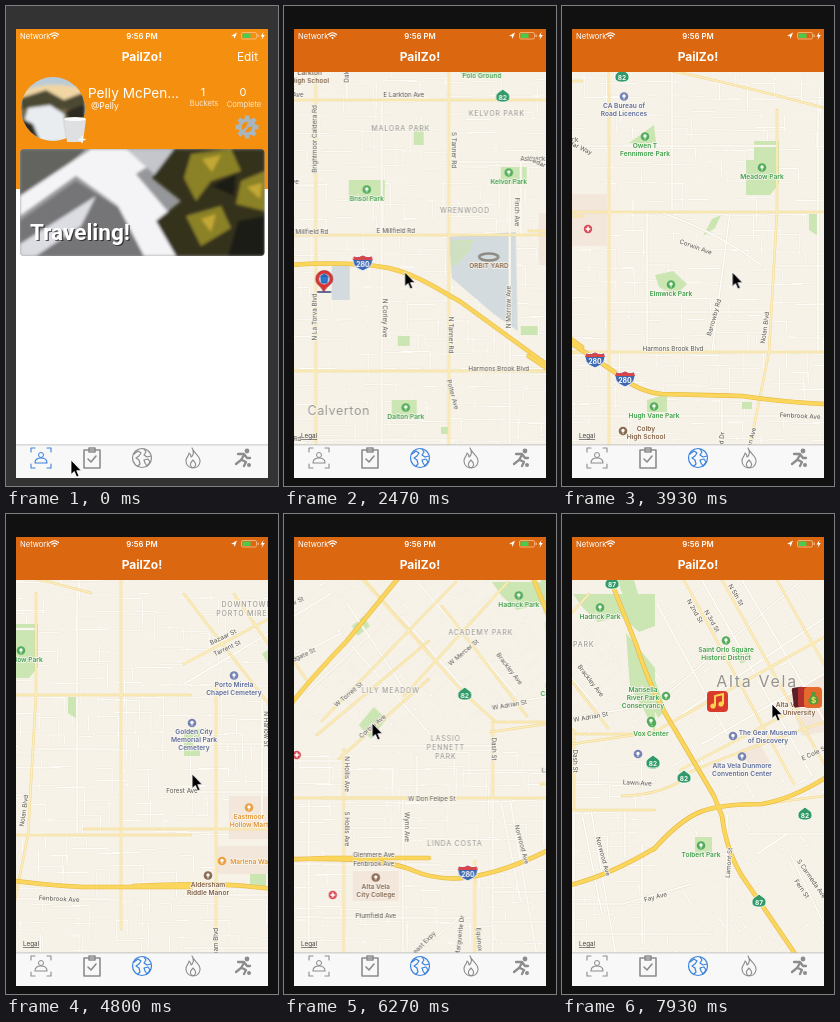
Animation, 272 px wide and 480 px high, one loop 8 s. Source, as an HTML page:

```html
<!DOCTYPE html>
<html lang="en">
<head>
<meta charset="utf-8">
<title>Bucket map</title>
<style>
html,body{margin:0;width:100%;height:100%;overflow:hidden;background:#111}
svg{display:block;width:100vw;height:100vh;font-family:Inter,Roboto,"Liberation Sans",sans-serif}
.r,.p,.k,.b,.o,.a,.c{text-anchor:middle;paint-order:stroke;stroke:#faf7ef;stroke-width:1.6px;stroke-linejoin:round;font-size:6.6px}
.r{fill:#55534e;font-size:6.3px}
.p{fill:#3f9f4b;font-weight:600}
.k{fill:#806046;font-weight:600}
.b{fill:#5d6c9c;font-weight:600}
.o{fill:#e2922f;font-weight:600}
.a{fill:#a09e99;font-size:7px;letter-spacing:.8px;font-weight:500}
.c{fill:#96938e;font-size:12.5px;letter-spacing:.6px}
.big{font-size:16px;letter-spacing:1.7px}
</style>
</head>
<body>
<svg viewBox="0 0 272 480" xmlns="http://www.w3.org/2000/svg"></svg>
<script>
const LOOP = 8000, SWITCH = 1000;

// Each region is drawn in its own view; `at` shifts it into the world.
const regions = [
  { at: [0, 0],
    grey: 'M133 262H151V296H133ZM250 233L317 228 319 327 295 310 253 274Z',
    park: 'M37 161H48V189H25V173H37ZM150 176H186V197H150ZM215 122H225V141H215ZM10 338H38V357H10ZM193 396H218V414H193ZM199 332H211V342H199ZM242 423H249V430H242ZM302 163H328V180H302ZM322 322H339V331H322ZM256 236H275L270 247 256 262ZM262 66H302V70H262Z',
    main: 'M0 96H350M0 231H350M0 367H350M117 60V480M250 60V480M52 60V250',
    minor: 'M0 182H117M52 250V450M183 96V440M311 180V440M0 436H262M148 60V96M10 140H52M250 158H350M322 158V230',
    hwy: 'M-10 261L90 261Q150 257 190 264C220 271 240 286 262 298L350 362',
    text: `k 111 71 0 Larkton/High School
r 83 93 0 W Larkton Ave
r 205 93 0 E Larkton Ave
r 150 72 -90 Dale
r 118 135 -90 Brightmoor Caldera Rd
a 202 127 0 MALORA PARK
p 40 185 0 Delsa Park
p 168 197 0 Brisol Park
r 22 162 0 Calder Ave
r 83 180 0 Orvella Ave
r 253 146 90 S Tanner Rd
a 266 209 0 WRENWOOD
r 113 230 0 Millfield Rd
r 197 229 0 E Millfield Rd
r 50 299 -90 N Hadwick Rd
r 118 313 -90 N La Torva Blvd
r 184 314 90 N Corley Ave
r 250 331 90 N Tanner Rd
r 252 391 75 Potter Ave
p 24 357 0 Heritage Park
k 22 408 0 La Torva College
c 140 411 0 Calverton
p 207 415 0 Dalton Park
r 82 437 0 McGarrow Rd
P 283 74 0 Polo Ground
a 298 112 0 KELVOR PARK
p 310 180 0 Kelvor Park
r 334 157 0 Ashwick
r 316 208 90 Finch Ave
r 312 303 -90 N Morrow Ave
K 290 264 0 ORBIT YARD
r 300 367 0 Harmons Brook Blvd`,
    signs: [['I', 164, 259, 280], ['S', 304, 92, 82]] },
  { at: [330, 21],
    pink: 'M10 188H45V240H10Z',
    park: 'M192 135H217V178L208 189H184V154H192ZM67 137L92 119 94 136 82 138ZM141 230L150 213 159 209 153 222ZM93 269L111 265 125 278 113 290 97 281ZM85 394L105 388V406H85ZM247 208H256V230L247 224ZM180 396H190V403H180Z',
    main: 'M0 206H370M47 50V440M0 346H370M85 60Q150 72 270 104M215 104V206L207 346 186 450M300 90V440',
    minor: 'M10 140H215M98 206Q160 228 200 260M168 206L150 346M110 66V206M160 395V450M85 346V206M215 260H300M10 410H290M256 100V346M47 306H207',
    hwy: 'M0 331L54 367Q76 386 100 388L180 390Q220 396 262 398H370',
    text: `b 62 102 0 CA Bureau of/Road Licences
p 83 142 0 Owen T/Fennimore Park
p 200 173 0 Meadow Park
r 133 243 20 Corwin Ave
p 109 290 0 Elmwick Park
r 154 312 -74 Barrowby Rd
r 205 322 -82 Nolan Blvd
r 111 345 0 Harmons Brook Blvd
p 92 412 0 Hugh Vane Park
r 238 412 3 Fenbrook Ave
K 84 425 0 Colby/High School
r 14 142 25 Cedar Way
r 161 442 -85 Garland Dr
r 190 438 -75 Linden Ave`,
    signs: [['S', 60, 70, 82], ['I', 33, 354, 280], ['I', 63, 373, 280], ['H', 26, 223], ['K', 61, 425]] },
  { at: [683, 66],
    pink: 'M55 262H98V305H55ZM43 312H98V340H43ZM186 368H232V398H186Z',
    park: 'M88 120L103 109 109 122 96 133ZM192 222L207 204 220 216 204 236ZM76 340H92V352H76ZM10 195H26V222H10Z',
    main: 'M-90 295H262M42 150V460M177 246V460M188 66L262 150M150 232L262 138M172 256L262 176M10 130L130 66M60 60L142 180M10 60L110 190',
    minor: 'M88 165V295M10 150L110 90M100 130L165 90M100 168L175 130M10 258H175M236 295V440M10 361H262M10 414H262M142 295V440M20 210H88M177 325H262M180 100L240 190M205 130L140 190',
    hwy: 'M-40 352Q40 348 80 353T160 355H262M252 50L180 138Q140 180 122 204 110 226 110 270V330L116 460',
    text: `a 73 73 0 DOWNTOWN/PORTO MIRELA
K 129 70 0 University
r 50 105 -25 Bazaar St
r 54 116 -25 Tarrent St
r 125 103 -25 Willow St
b 60 153 0 Porto Mirela/Chapel Cemetery
r 135 155 -25 Oldgate St
B 20 200 0 Golden City/Memorial Park/Cemetery
r 90 195 90 N Harlow St
r 183 193 -40 W Torrell St
a 224 190 0 LILY MEADOW
r 207 225 -40 Corbin Ave
r 8 259 0 Forest Ave
o 75 285 0 Eastmoor/Hollow Mart
O 77 330 0 Marlena Way
r 178 271 90 N Hollis Ave
r 178 326 90 S Hollis Ave
r 265 298 0 W Don Felipe St
r 238 324 90 Wynn Ave
k 34 353 0 Aldersham/Riddle Manor
r 207 354 0 Glenmere Ave
r 207 363 0 Fenbrook Ave
r 44 420 -90 S Aldersham Blvd
k 209 386 0 Alta Vela/City College
r 209 415 0 Plumfield Ave`,
    signs: [['I', 110, 264, 880], ['H', 130, 252], ['H', 166, 392], ['O', 48, 327], ['B', 18, 189]] },
  { at: [828, 79],
    park: 'M180 66H262V98L246 104 228 88 205 94 190 80ZM233 105L262 140V205L250 180 237 160ZM40 110L52 100 58 110 46 120Z',
    main: 'M30 40L153 178 184 206H262M10 205L144 66M92 180L196 66M10 282H262M163 345V450M181 206V282M130 90L215 200',
    minor: 'M100 60L205 180M180 190L262 176M91 282V440M181 282V440M10 349H130M10 402H160M198 282L225 440M150 254H262M60 230H180M40 130L120 220M90 100L150 170M105 282V240M100 440L150 400M232 282V330',
    hwy: 'M0 343Q72 342 100 354T158 361Q205 354 262 320',
    text: `p 207 91 0 Hadrick Park
a 169 119 0 ACADEMY PARK
r 153 138 -40 W Mercer St
r 196 154 52 Brackley Ave
P 250 164 0 Marisella/River Park/Conservancy
r 198 191 -10 W Adrian St
P 258 208 0 Vox Center
a 134 225 0 LASSIO/PENNETT/PARK
r 180 233 90 Dash St
r 245 257 3 Lawn Ave
a 143 330 0 LINDA COSTA
r 208 329 75 Norwood Ave
r 108 434 -45 Northeast Expy
r 150 420 -83 Marguerite Dr
r 166 430 85 Equinox Ave`,
    signs: [['S', 153, 178, 82], ['I', 156, 357, 280], ['S', 260, 235, 82], ['B', 245, 226], ['P', 259, 195]] },
  { at: [997, 65],
    pink: 'M178 236L197 228 208 248 190 256ZM225 180L262 160V218L240 222Z',
    park: 'M76 160L87 150 104 196 96 204ZM133 323H150V339H133ZM173 138L184 132 190 144 179 150ZM55 66H72L82 100 70 104Z',
    main: 'M92 218L262 123M10 230L92 218M118 256L262 180M160 66L262 250M122 66L232 270M215 66L262 150M128 258Q170 240 262 208M200 290L262 282M60 282Q105 280 125 262',
    minor: 'M105 180L240 66M120 200L262 104M140 230L262 160M140 66L250 262M180 66L262 206M95 90L165 220M165 300V440M10 390H60L130 370M120 340H170M228 340L262 410M185 320H262M20 300L40 400M80 330V430M195 340L225 320M10 420H150',
    hwy: 'M42 50L74 130Q90 180 112 214L152 282 160 302Q164 336 180 362L240 450M92 335Q118 306 138 298T200 290Q235 284 275 256',
    text: `r 131 98 60 N 2nd St
r 148 108 60 N 3rd St
r 172 82 60 N 5th St
p 164 138 0 Saint Orlo Square/Historic District
c 195 173 0 Alta Vela
K 237 193 0 Alta Vela State/University
B 206 221 0 The Gear Museum/of Discovery
b 180 254 0 Alta Vela Dunmore/Convention Center
r 253 241 -25 E Cole St
r 75 271 3 Lawn Ave
p 139 343 0 Tolbert Park
r 169 349 -85 Lamont St
r 94 385 -15 Fay Ave
r 248 366 55 S Carmeda Ave
r 238 376 55 Fern St`,
    signs: [['S', 50, 69, 87], ['S', 91, 248, 82], ['S', 122, 263, 82], ['S', 243, 300, 82], ['S', 197, 387, 87], ['B', 171, 222], ['P', 104, 182], ['P', 89, 207]] }
];

const tint = { P: '#55ad5c', K: '#8a6b52', B: '#7583b5', O: '#eba043' };
const path = (d, fill, stroke = 'none', w = 1, more = '') =>
  `<path d="${d}" fill="${fill}" stroke="${stroke}" stroke-width="${w}" ${more}/>`;
const line = (d, color, w) => path(d, 'none', color, w, 'stroke-linejoin="round" stroke-linecap="round"');
const disc = (x, y, r, fill, more = '') => `<circle cx="${x}" cy="${y}" r="${r}" fill="${fill}" ${more}/>`;
const rect = (x, y, w, h, fill, more = '') => `<rect x="${x}" y="${y}" width="${w}" height="${h}" fill="${fill}" ${more}/>`;
const text = (x, y, s, size, fill, more = '') => `<text x="${x}" y="${y}" font-size="${size}" fill="${fill}" ${more}>${s}</text>`;
const move = (x, y, body) => `<g transform="translate(${x} ${y})">${body}</g>`;
const mid = 'text-anchor="middle"';

const dot = (kind, x, y) => disc(x, y, 4.3, tint[kind]) + disc(x, y - .6, 1.7, '#fff') + rect(x - .4, y, .8, 3, '#fff');

function sign([kind, x, y, n]) {
  if (kind === 'I') return move(x, y,
    path('M-9-7Q-4-5 0-8Q4-5 9-7Q13 3 0 8Q-13 3-9-7Z', '#3f68b3', '#fff', 1) +
    path('M-9-6.5Q-4-4.5 0-7.4Q4-4.5 9-6.5L10-3H-10Z', '#d8464a') +
    text(0, 4, n, 7, '#fff', mid + ' font-weight="700"'));
  if (kind === 'S') return move(x, y,
    path('M0-7C3-4 7-3 7 1C7 5 4 6 0 6S-7 5-7 1C-7-3-3-4 0-7Z', '#319a68', '#fff', .8) +
    text(0, 3.6, n, 6.5, '#fff', mid + ' font-weight="700"'));
  if (kind === 'H') return disc(x, y, 4.2, '#d94a55') + path(`M${x - 2.4} ${y}h4.8M${x} ${y - 2.4}v4.8`, 'none', '#fff', 1.6);
  return dot(kind, x, y);
}

function label(row) {
  const [, k, x, y, rot, s] = row.match(/^(\S) (\S+) (\S+) (\S+) (.*)$/);
  const low = k.toLowerCase(), big = s === 'Alta Vela' ? ' big' : '';
  const spans = s.split('/').map((t, i) => `<tspan x="${x}" y="${+y + i * (low === 'a' ? 9 : 8)}">${t}</tspan>`).join('');
  const icon = 'pkbo'.includes(k) ? dot(k.toUpperCase(), +x, y - 11.5) : '';
  return icon + `<text class="${low}${big}" transform="rotate(${rot} ${x} ${y})">${spans}</text>`;
}

function streets() {
  let seed = 7, d = '';
  const rand = () => (seed = seed * 16807 % 2147483647) / 2147483647;
  for (let x = -10; x < 1290; x += 21) for (let y = 40; y < 560; y += 17) {
    const deg = x > 1080 ? -30 : x > 770 && y < 300 ? -40 : 0, a = deg * Math.PI / 180;
    const px = x + rand() * 9, py = y + rand() * 8, w = 10 + rand() * 26, h = rand() < .6 ? 8 + rand() * 22 : 0;
    const c = Math.cos(a), s = Math.sin(a);
    d += `M${px.toFixed(1)} ${py.toFixed(1)}l${(w * c).toFixed(1)} ${(w * s).toFixed(1)}`;
    if (h) d += `l${(-h * s).toFixed(1)} ${(h * c).toFixed(1)}`;
  }
  return line(d, '#ebe5d8', 1.7) + line(d, '#fffdf8', 1);
}

const layer = draw => regions.map(r => move(...r.at, draw(r))).join('');

const pin = path('M125 288C122 281 117 281 117 275A8.5 8.5 0 0 1 134 275C134 281 128 281 125 288Z', '#d93434', '#8f2430', .6) +
  disc(125.5, 275, 5.4, '#bcd9f5') + path('M122 272h7l-1 7h-5zM123 272q2.500-4 5 0', '#2b78cf', '#1d4b91', .8) +
  line('M119 288H132', '#39407c', 1.3);

const goals = move(1153, 252,
  rect(-11, -10, 21, 21, '#d93a2c', 'rx="4"') + path('M-3 5V-5L5-7V3', 'none', '#ffd34d', 2) +
  disc(-5, 5, 2.600, '#ffd34d') + disc(3, 3, 2.600, '#ffd34d')) +
  move(1242, 249,
    rect(-14, -12, 12, 20, '#5a2028', 'rx="2" transform="rotate(-8)"') + rect(-9, -11, 12, 20, '#b32f30', 'rx="2"') +
    rect(-3, -11, 18, 21, '#e66a2c', 'rx="4"') + path('M4-6h5l-1 3q5 4 3 8q-5 3-9 0q-2-4 3-8z', '#4f9e3b') +
    text(6.500, 5, '$', 8, '#ffe26a', mid + ' font-weight="700"'));

const world = streets() +
  layer(r => path(r.grey || '', '#d3dbde') + path(r.pink || '', '#f3e7dc') + path(r.park, '#cbe6b3')) +
  path('M252 237H274L268 247 253 263Z', '#cfe0c2') +
  layer(r => line(r.minor, '#e7dfce', 2.4) + line(r.minor, '#fffefa', 1.6)) +
  layer(r => line(r.main, '#efd58d', 2.500) + line(r.main, '#fdeebd', 1.6)) +
  layer(r => line(r.hwy, '#e5b742', 4.600)) + layer(r => line(r.hwy, '#fbd65c', 3.4)) +
  '<ellipse cx="290" cy="253" rx="9.500" ry="3.500" fill="none" stroke="#8f8b84" stroke-width="2.500"/>' +
  layer(r => r.text.split('\n').map(label).join('') + r.signs.map(sign).join('')) +
  disc(14, 441, 5, '#22a58c') + pin + goals;

function header(color, depth) {
  return rect(10, 23, 252, depth, color) +
    text(14, 32.600, 'Network', 7.600, '#fff') +
    line('M44.500 28.500Q48.500 25 52.500 28.500M46 30.300Q48.500 28 51 30.300', '#fff', 1.2) + disc(48.500, 32, 1, '#fff') +
    text(136, 32.600, '9:56 PM', 7.800, '#fff', mid + ' font-weight="600"') +
    path('M225 30L231 26.500 228.500 33 228 30.300Z', '#fff') +
    rect(235.500, 26.500, 15, 6.500, 'none', 'rx="1.500" stroke="#f6c08c" stroke-width=".8"') + rect(236.500, 27.500, 8, 4.500, '#4cc94f') +
    rect(251.500, 28.500, 1.2, 2.500, '#f6c08c') + path('M257.500 26L254.500 30.500H256.500L255.500 34 258.800 29H256.800Z', '#fff') +
    text(136, 55.300, 'PailZo!', 12, '#fff', mid + ' font-weight="700"');
}

const icons = [
  line('M-10-6V-10H-6M6-10H10V-6M10 6V10H6M-6 10H-10V6M-6 5Q-6 0 0 0T6 5Z', 'currentColor', 1.1) + disc(0, -3, 2.500, 'none', 'stroke="currentColor"'),
  line('M-8-8H8V10H-8ZM-3-10H3V-6H-3ZM-4 1L-1 4 4-2', 'currentColor', 1.6),
  disc(0, 0, 9.500, 'none', 'stroke="currentColor" stroke-width="1.200"') +
    line('M-8-4L-4-7-1-5-3-2-6 0-3 2-2 6-4 8M2-9L4-6 2-3 5-1 9-2M2 2L6 1 8 4 5 8 3 5Z', 'currentColor', 1.2),
  line('M-1-10C1-4 8-2 7 4C6 9 3 10 0 10S-7 8-7 3C-7-1-4-2-4-5C-2-4-2-2-2-1C1-3 1-7-1-10ZM0 10C-4 8-3 5 0 2C3 5 4 8 0 10Z', 'currentColor', 1.1),
  disc(4, -7, 2.400, 'currentColor') + line('M-5-4L1-4 4 0H7M1-3L-2 2-7 6M-1 2L3 4 1 8', 'currentColor', 2.300) + disc(6, 7, 2, 'currentColor')
];
const tabs = active => rect(10, 439, 252, 33, '#f8f8f8') + rect(10, 438.500, 252, .8, '#b8b8b8') +
  icons.map((b, i) => `<g color="${i === active ? '#3a82dc' : '#8c8c8c'}">${move([35, 86, 136, 187, 237][i], 452, b)}</g>`).join('');

const card = rect(14, 143, 245, 107, '#96979a') + '<g filter="url(#soft)">' +
  path('M14 143H80L40 180 14 200Z', '#63635f') + path('M14 215L70 175 118 205 140 250H14Z', '#747577') +
  path('M85 143H170L130 168 170 215 185 250H138L112 200 70 170 14 210V190Z', '#f4f4f7') +
  path('M14 238L90 190 75 220 30 250H14Z', '#dcdde2') + path('M120 143H185L150 170Z', '#c4c6cb') +
  path('M168 143H259V250H170L150 215 175 195 146 172Z', '#36331f') +
  path('M185 148L225 143 235 165 205 175 190 195 178 172ZM235 175L259 165V205L230 198ZM180 210L215 200 225 222 195 240Z', '#8b8126') +
  path('M196 153L215 149 206 166ZM195 213L210 208 205 226ZM241 181L256 177 254 193Z', '#c4a834') +
  path('M205 180L230 168 228 190ZM232 215L259 210V250H222Z', '#1d1d17') + '</g>';

const face = rect(15, 71, 64, 64, '#b9cbd8') + '<g filter="url(#soft)">' +
  path('M15 86Q45 72 79 84V96H15Z', '#f1d6a4') + path('M15 92L40 84 58 94 79 86V112H15Z', '#4b4a32') +
  path('M15 103H79V135H15Z', '#72654a') + path('M22 102L44 99 58 108 62 135H32L18 116Z', '#e9edf0') +
  path('M15 112L27 118 34 135H15ZM60 105L79 98V135H66Z', '#2f2b22') + '</g>';

const teeth = Array.from({ length: 8 }, (_, i) => rect(-2.200, -11.500, 4.400, 5, '#a9b6bd', `transform="rotate(${i * 45})"`)).join('');
const home = rect(0, 0, 272, 480, '#333') + rect(10, 23, 252, 449, '#fff') + header('#f58f10', 160) +
  text(231, 55.300, 'Edit', 11.800, '#fff') +
  `<g clip-path="url(#round)">${face}</g>` +
  path('M58 113H80L77 136H61Z', '#dfe0e2') + '<ellipse cx="69" cy="113" rx="11" ry="2" fill="#fafafa"/>' +
  line('M73 133.500H79M76 130.500V136.500', '#fff', 1.300) +
  text(82, 92, 'Pelly McPen...', 13.600, '#fff') + text(85, 103, '@Pelly', 8.600, '#fff') +
  text(197, 90, '1', 11, '#fff', mid) + text(198, 100, 'Buckets', 7.600, '#fbe6cb', mid) +
  text(237, 90, '0', 11, '#fff', mid) + text(238, 100.500, 'Complete', 7.600, '#fbe6cb', mid) +
  move(241, 121, teeth + disc(0, 0, 7, 'none', 'stroke="#a9b6bd" stroke-width="3.500"') + line('M-4 5L2-2', '#a9b6bd', 2.500) + disc(2.500, -2.500, 2.600, '#a9b6bd')) +
  `<g clip-path="url(#card)">${card}</g>` +
  `<g font-family="Roboto,sans-serif" font-weight="700">${text(25.300, 235.300, 'Traveling!', 22.500, '#222', 'opacity=".75"')}${text(24, 234, 'Traveling!', 22.500, '#fff')}</g>` + tabs(0);

document.querySelector('svg').innerHTML = `<defs>
<clipPath id="view"><rect x="10" y="66" width="252" height="373"/></clipPath>
<clipPath id="round"><circle cx="47" cy="103" r="32"/></clipPath>
<clipPath id="card"><rect x="14" y="143" width="244.500" height="107" rx="4"/></clipPath>
<filter id="soft"><feGaussianBlur stdDeviation="1.500"/></filter></defs>
<g id="home">${home}</g>
<g id="map">${rect(0, 0, 272, 480, '#111')}${rect(10, 66, 252, 373, '#f7f2e8')}
<g clip-path="url(#view)"><g id="world">${world}</g></g>
${text(17, 432, 'Legal', 6.300, '#444', 'text-decoration="underline"')}${header('#db6711', 43)}${tabs(2)}</g>
<g id="cursor">${path('M0 0V14.500L3.300 11.500 5.600 17 8 16 5.700 10.700H10.300Z', '#000', '#fff', .8)}</g>`;

// Rows are time, x, y and an optional easing towards the next row.
const glide = 'cubic-bezier(.15,.6,.4,1)';
const pan = [
  [0, 0, 0], [1950, 0, 0], [2470, -85, -2], [2670, -137, -5, glide], [3070, -180, -8], [3270, -180, -8],
  [3670, -300, -19, glide], [3920, -330, -21], [4070, -330, -21], [4470, -468, -40, glide], [4800, -515, -46],
  [4930, -515, -46], [5330, -645, -62, glide], [5590, -683, -66], [5800, -683, -66], [6270, -800, -77, glide],
  [6670, -828, -79], [7000, -828, -79], [7400, -955, -68, glide], [7870, -997, -65], [LOOP, -997, -65]
];
const pointer = [
  [0, 65, 454], [70, 65, 454], [500, 115, 461], [870, 137, 452], [1000, 137, 452, 'ease-in-out'], [1400, 126, 210],
  [1950, 206, 268], [2470, 121, 266], [2670, 69, 263, 'ease-in-out'], [3270, 205, 277], [3670, 85, 266],
  [3930, 170, 266], [4070, 212, 268], [4470, 74, 249, 'ease-in-out'], [4930, 208, 262], [5330, 78, 246],
  [5600, 133, 248], [5800, 205, 220], [6270, 88, 209], [6870, 193, 198], [7000, 205, 185], [7400, 78, 196],
  [7930, 210, 190], [LOOP, 210, 190]
];
const $ = id => document.getElementById(id);
const play = (id, frames) => { $(id).animate(frames, { duration: LOOP, iterations: Infinity }).startTime = 0; };
const track = (id, rows) => play(id, rows.map(([t, x, y, easing = 'linear']) =>
  ({ offset: t / LOOP, transform: `translate(${x}px,${y}px)`, easing })));

track('world', pan);
track('cursor', pointer);
play('map', [
  { offset: 0, opacity: 0, easing: 'step-end' },
  { offset: SWITCH / LOOP, opacity: 1, easing: 'step-end' },
  { offset: 1, opacity: 1 }
]);
</script>
</body>
</html>
```
